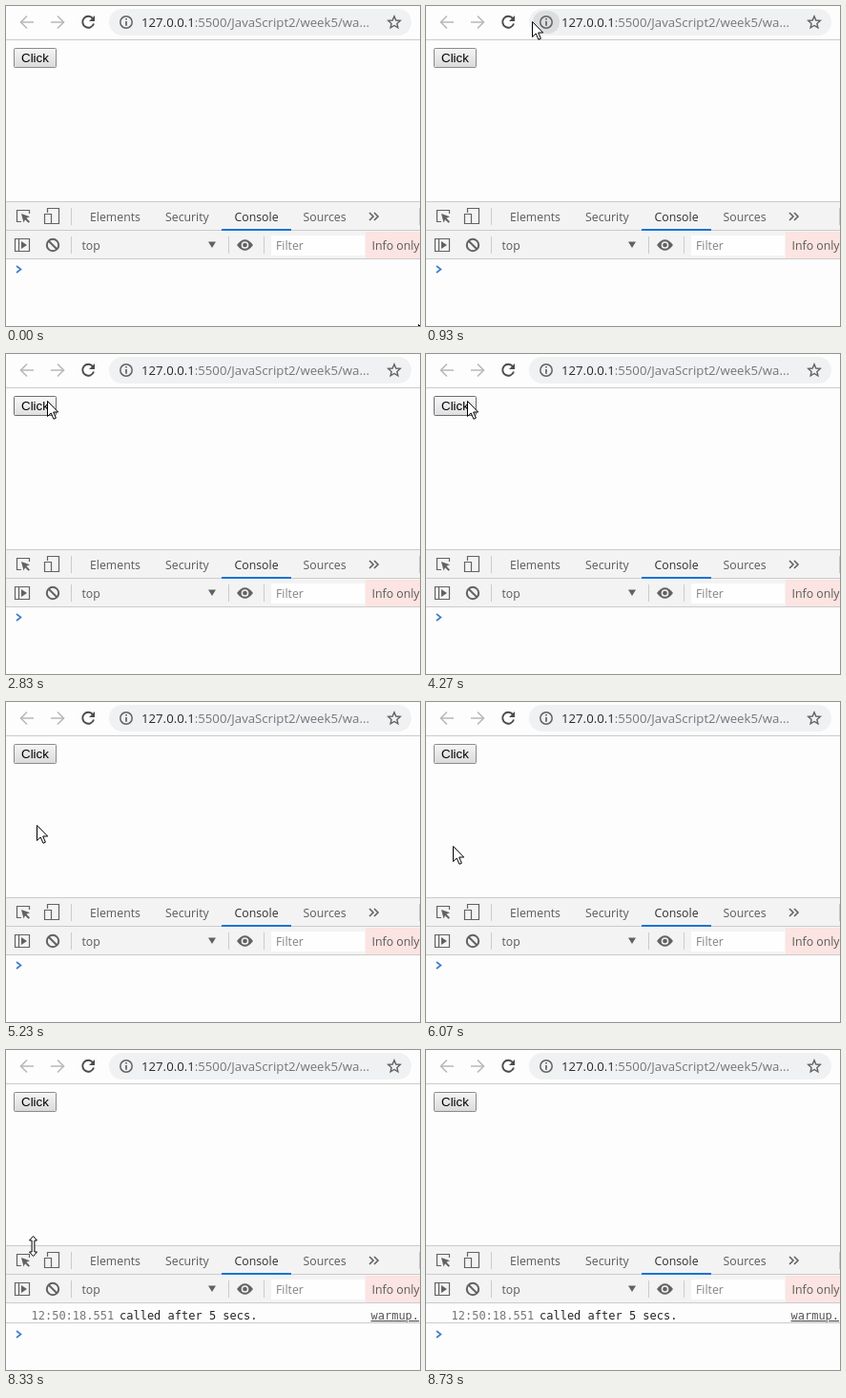
Recreate the animation shown at these times as an HTML page. Size 434 px wide and 336 px high, loop 9.03 s.

```html
<!DOCTYPE html>
<html lang="en">
<head>
<meta charset="utf-8">
<title>Delayed console message</title>
<style>
  html, body { margin: 0; width: 100%; height: 100%; overflow: hidden; background: #fdfdfd; }
  svg { display: block; width: 434px; height: 336px; }
  text { font: 12.3px "Open Sans", "Noto Sans", sans-serif; fill: #5a5a5a; white-space: pre; }
  .url { font-size: 13.2px; fill: #74777a; }
  .mono { font: 12px "DejaVu Sans Mono", "Liberation Mono", monospace; fill: #252525; }
  .line { fill: none; stroke: #626262; stroke-width: 1.6; }
  .thin { stroke-width: 1.2; }
  .rule { fill: none; stroke: #cbcbcb; }
  .solid { fill: #626262; }
</style>
</head>
<body>
<svg viewBox="0 0 434 336">
  <linearGradient id="face" x2="0" y2="1">
    <stop stop-color="#f5f5f5"/>
    <stop offset="1" stop-color="#dadada"/>
  </linearGradient>
  <linearGradient id="faceHover" x2="0" y2="1">
    <stop stop-color="#f8f8f8"/>
    <stop offset="1" stop-color="#dfdfdf"/>
  </linearGradient>

  <!-- browser toolbar -->
  <path class="rule" d="M0 35.5H434"/>
  <g class="line">
    <path d="M29 17H16M22 10.5L15.5 17L22 23.5M47 17H60M54 10.5L60.5 17L54 23.5" stroke="#b9b9b9"/>
    <path d="M91 13A6 6 0 1 0 92 18.5" stroke="#4c4c4c" stroke-width="1.9"/>
  </g>
  <path d="M93 10V16H87Z" fill="#4c4c4c"/>
  <rect x="108" y="3" width="317" height="28" rx="14" fill="#f0f1f2"/>
  <rect id="chip" x="112" y="5" width="28" height="24" rx="12" fill="#dcdddf"/>
  <g class="line thin">
    <circle cx="126" cy="17" r="6.2" stroke-width="1.5"/>
    <path d="M126 16V20.7M126 13V14.6" stroke-width="1.7"/>
    <path d="M407 10.8L408.8 15L413.3 15.4L409.9 18.4L410.9 22.8L407 20.5L403.1 22.8L404.1 18.4L400.7 15.4L405.2 15Z" stroke-width="1.4"/>
  </g>
  <text class="url" x="142" y="22"><tspan fill="#2a2a2c">127.0.0.1</tspan>:5500/JavaScript2/week5/wa...</text>

  <!-- page -->
  <rect id="button" x="8.5" y="44.5" width="44" height="20" rx="1"/>
  <text x="16" y="59" style="font: 13.33px 'Liberation Sans', Arial, sans-serif; fill: #000">Click</text>

  <!-- developer tools -->
  <rect y="205" width="434" height="61" fill="#f3f3f3"/>
  <path class="rule" d="M0 205.5H434M0 235.5H434M0 265.5H434M68.5 212V230M433.5 212V230M68.5 242V260M233.5 242V260M270.5 242V260"/>
  <rect x="226" y="234" width="73" height="2" fill="#1a73d8"/>
  <g class="line thin">
    <path d="M16 226.5H11.5V214.5H24.5V218"/>
    <path d="M43.5 217V212.5H55.5V228.5H48M40.5 218.5H47.5V228.5H40.5Z"/>
    <path d="M381 217L385 221L381 225M386 217L390 221L386 225" stroke-width="1.6"/>
    <path d="M9.5 244.5H24.5V257.5H9.5ZM13.5 244.5V257.5"/>
    <path d="M44.5 246.5L53.5 255.5" stroke-width="2"/>
    <circle cx="49" cy="251" r="6.2" stroke-width="2"/>
  </g>
  <g class="solid">
    <path d="M16 218L25 221.3L21.4 222.8L25 226.4L23.6 227.8L20 224.2L18.5 227.6Z"/>
    <path d="M16 247V255L22 251ZM212 247.5H220L216 254Z"/>
    <path d="M242 251Q250.5 239.5 259 251Q250.5 262.5 242 251Z"/>
  </g>
  <circle cx="250.5" cy="251" r="3.1" fill="#626262" stroke="#f3f3f3" stroke-width="1.5"/>
  <text x="88" y="226">Elements</text>
  <text x="167" y="226">Security</text>
  <text x="239.5" y="226" style="fill: #303030">Console</text>
  <text x="311.5" y="226">Sources</text>
  <text x="79.5" y="256">top</text>
  <rect x="278" y="241" width="98" height="21" fill="#fefefe"/>
  <text x="283" y="256" style="fill: #838383">Filter</text>
  <rect x="377" y="237" width="57" height="28" fill="#fbe4e1"/>
  <text x="383.5" y="256">Info only</text>

  <!-- console -->
  <g id="message">
    <path class="rule" d="M0 286.5H434" stroke="#f0f0f0"/>
    <text class="mono" x="26.5" y="283" style="fill: #777">12:50:18.551</text>
    <text class="mono" x="119" y="283">called after 5 secs.</text>
    <text class="mono" x="382.5" y="283" style="fill: #555" text-decoration="underline">warmup.</text>
  </g>
  <path id="prompt" d="M11 -3.5L15.5 0L11 3.5" fill="none" stroke="#3c80c8" stroke-width="1.7"/>

  <!-- pointers, hot spot at 0,0 -->
  <g fill="#fff" stroke="#000">
    <path id="arrow" d="M.5 .5V16.5L4.2 13L7 19.3L9.4 18.2L6.7 12H11.7Z"/>
    <path id="resize" d="M.5 -10.5L4.5 -6H1.9V6H4.5L.5 10.5L-3.5 6H-.9V-6H-3.5Z"/>
  </g>
</svg>
<script>
const LOOP = 9030, STEP = 33.4;
const CLICK = [2250, 2370], MESSAGE = 7300;
// time, x, y of the pointer
const path = [
  [0, 432, 334], [930, 110, 15], [1750, 44, 49], [2000, 42, 56], [2200, 43, 49],
  [4750, 43, 49], [5230, 32, 129], [5480, 28, 151], [7550, 28, 151],
  [8250, 28, 206], [8430, 28, 206], [8720, 434, 345], [9000, 434, 345], [LOOP, 432, 334]
];
const el = id => document.getElementById(id);
const show = (id, on) => el(id).style.display = on ? '' : 'none';
const within = (v, a, b) => v >= a && v <= b;

function pointer(t) {
  const i = path.findIndex(p => p[0] > t);
  const [t0, x0, y0] = path[i - 1], [t1, x1, y1] = path[i];
  const u = (t - t0) / (t1 - t0), e = u * u * (3 - 2 * u);
  return [x0 + (x1 - x0) * e, y0 + (y1 - y0) * e].map(Math.round);
}

function draw(now) {
  const t = Math.floor(now % LOOP / STEP + .01) * STEP;
  const [x, y] = pointer(t);
  const edge = within(y, 202, 208);
  for (const id of ['arrow', 'resize']) el(id).setAttribute('transform', `translate(${x} ${y})`);
  show('arrow', !edge);
  show('resize', edge);
  show('chip', within(x, 108, 140) && within(y, 4, 30));

  const hover = within(x, 8, 53) && within(y, 44, 65);
  const pressed = hover && within(t, ...CLICK);
  el('button').setAttribute('fill', pressed ? '#e4e4e4' : hover ? 'url(#faceHover)' : 'url(#face)');
  el('button').setAttribute('stroke', hover ? '#6c6c74' : '#8a8a8e');

  const logged = t >= MESSAGE;
  show('message', logged);
  el('prompt').setAttribute('transform', `translate(0 ${logged ? 298.5 : 276.5})`);
}

const start = performance.now();
function tick() {
  draw(performance.now() - start);
  requestAnimationFrame(tick);
}
tick();
</script>
</body>
</html>
```
